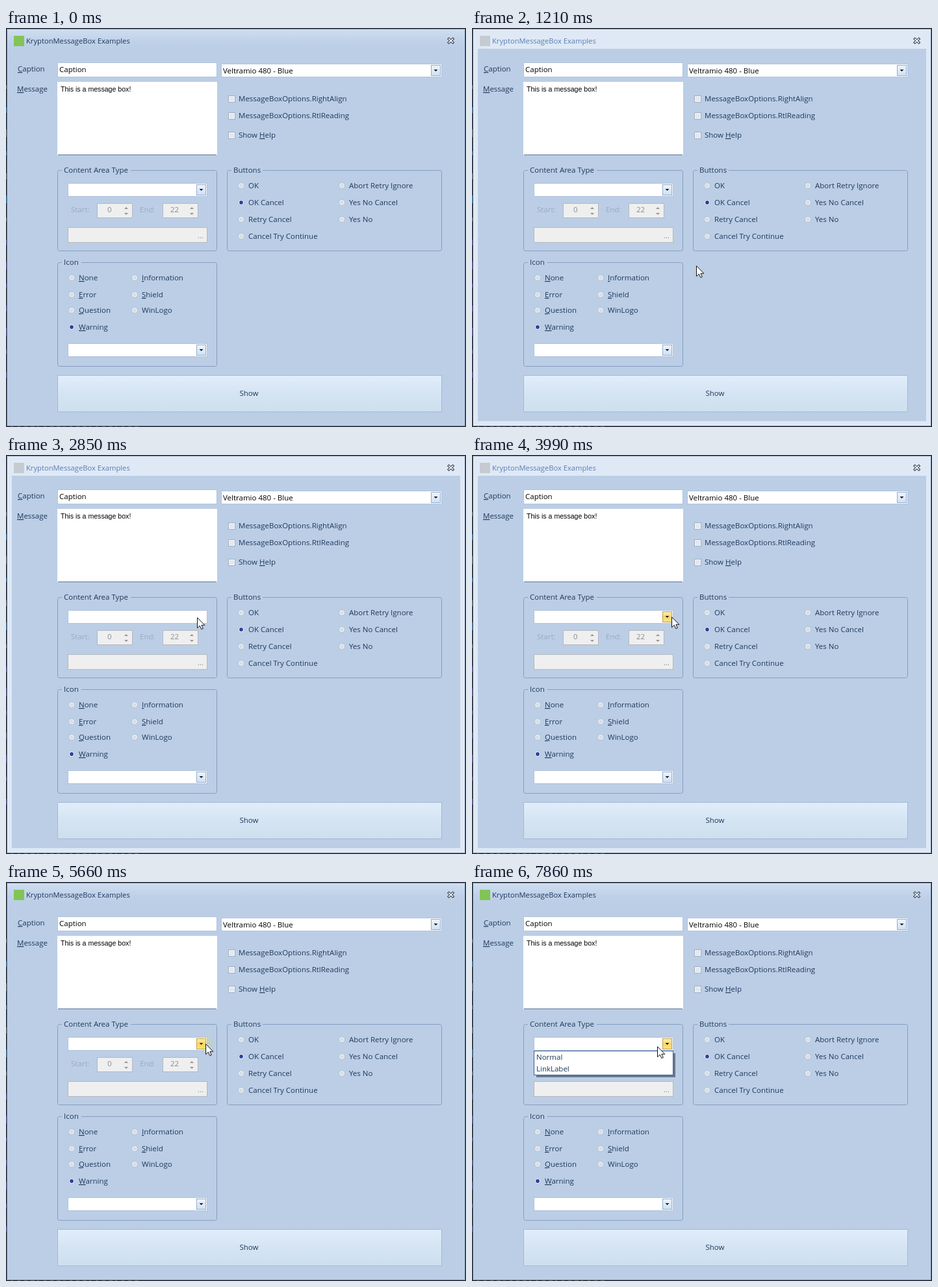
An HTML page that plays this animation: 708x615 px, repeating every 8 s.

```html
<!DOCTYPE html>
<html lang="en">
<head>
<meta charset="utf-8">
<title>Message box examples</title>
<style>
html, body { margin: 0; width: 100%; height: 100%; overflow: hidden; background: #1d1f24; }
svg { display: block; width: 708px; height: 615px; }
text { font: 11.5px "Open Sans", "Noto Sans", sans-serif; fill: #1e395b; white-space: pre; }
.title { font-size: 11.2px; }
.note { font: 10.6px "Liberation Sans", Arial, sans-serif; fill: #000; }
.value { fill: #000; }
.dim { fill: #9ba9bd; }
.off { fill: #858a91; }
.mid { text-anchor: middle; }
.key { text-decoration: underline; }

.anim { animation: 8s step-end -5ms infinite; }
.idle { animation-name: idle; }
.lit { animation-name: lit; }
.blank { animation-name: blank; }
.hot { animation-name: hot; }
.popup { animation-name: popup; }
.ring { animation-name: ring; }
.cursor { animation-name: move; }

@keyframes idle { 0%, 67.375%, 100% { opacity: 0 } 3% { opacity: 1 } }
@keyframes lit { 0%, 8.125%, 100% { opacity: 0 } 4.7% { opacity: 1 } }
@keyframes blank { 0%, 36.5%, 49.125%, 100% { opacity: 0 } 35.625%, 48.375% { opacity: 1 } }
@keyframes hot { 0%, 38.25% { opacity: 0 } 36.5%, 49.125%, 100% { opacity: 1 } }
@keyframes popup { 0% { opacity: 0 } 87.375%, 100% { opacity: 1 } }
@keyframes ring {
  0%, 71.625%, 89.875%, 100% { opacity: 0 }
  67.375% { opacity: .5; animation-timing-function: steps(5) }
  86.5% { opacity: .45; animation-timing-function: steps(4) }
}
@keyframes move {
  0% { transform: translate(500px, 640px) }
  3% { transform: translate(500px, 610px); animation-timing-function: steps(5) }
  7.25% { transform: translate(442px, 543px); animation-timing-function: steps(6) }
  12.5% { transform: translate(397px, 416px); animation-timing-function: steps(3) }
  15.125% { transform: translate(345px, 366px); animation-timing-function: steps(4) }
  18.625% { transform: translate(308px, 284px); animation-timing-function: steps(5) }
  22.875% { transform: translate(291px, 254px) }
  30.5% { transform: translate(291px, 254px); animation-timing-function: steps(2) }
  32.25%, 34.75% { transform: translate(291px, 250px) }
  35.625% { transform: translate(294px, 250px); animation-timing-function: steps(3) }
  38.25% { transform: translate(312px, 250px) }
  41.5% { transform: translate(312px, 249px) }
  47.5% { transform: translate(312px, 249px); animation-timing-function: steps(3) }
  49.875% { transform: translate(307px, 249px) }
  95.625% { transform: translate(307px, 249px); animation-timing-function: steps(3) }
  98.25%, 100% { transform: translate(285px, 253px) }
}
</style>
</head>
<body>
<svg id="stage" viewBox="0 0 708 615"></svg>
<script>
const INK = '#1e395b', PANEL = '#bbcee6', EDGE = '#5f7390';

// Labels take the vertical middle of the capitals; "&" marks the access key.
const text = (x, y, s, cls = '') =>
  `<text x="${x}" y="${y + 4}" class="${cls}">${s.replace(/&(\w)/, '<tspan class="key">$1</tspan>')}</text>`;

// Crisp box covering the pixels from x,y up to r,b.
const box = (x, y, r, b, fill, line, round = 0) =>
  `<rect x="${x + .5}" y="${y + .5}" width="${r - x - 1}" height="${b - y - 1}" rx="${round}" fill="${fill}" stroke="${line}"/>`;

const fill = (x, y, r, b, color) =>
  `<rect x="${x}" y="${y}" width="${r - x}" height="${b - y}" fill="${color}"/>`;

const arrow = (x, y, color = '#1a1a1a', h = 3) =>
  `<path d="M${x - 3} ${y}h6l-3 ${h}z" fill="${color}"/>`;

const anim = (name, body) => `<g class="anim ${name}">${body}</g>`;

const gradient = (id, ...stops) =>
  `<linearGradient id="${id}" x2="0" y2="1">${stops.map(([at, c]) =>
    `<stop offset="${at}" stop-color="${c}"/>`).join('')}</linearGradient>`;

const group = (x, y, r, b, label, gap) =>
  box(x, y, r, b, 'none', '#859ebf', 3) + fill(x + 7, y - 1, x + 7 + gap, y + 2, PANEL) +
  text(x + 10, y, label);

const combo = (x, y, r, b) =>
  box(x, y, r, b, '#fff', '#b1c3db') +
  box(r - 17, y + 2, r - 2, b - 2, 'url(#drop)', '#93acd0') + arrow(r - 9.5, y + 9);

const radio = (x, y, label, on) =>
  `<circle cx="${x}" cy="${y}" r="4.6" fill="${on ? '#f4f8fd' : '#e6ebf1'}" stroke="#b2bfd0"/>` +
  `<circle cx="${x}" cy="${y}" r="${on ? 2.9 : 2.5}" fill="${on ? '#2c429b' : '#d6dde6'}"/>` +
  text(x + 11, y, label);

const check = (y, label) =>
  box(342, y - 5, 353, y + 6, '#f5f7fa', '#a0aec2') + fill(344, y - 3, 351, y + 4, '#e3e8ef') +
  text(358, y, label);

const spinner = (x, label, value, labelX, valueX) =>
  text(labelX, 280, label, 'dim') + box(x, 270, x + 55, 293, '#efefef', '#b3b8c0') +
  text(valueX, 280, value, 'off') + arrow(x + 45, 279, '#939393', -3) + arrow(x + 45, 285, '#939393');

const titleBar = (logo, ink) =>
  fill(12, 12, 28, 28, logo) +
  `<text x="31" y="24" class="title" style="fill:${ink}">KryptonMessageBox Examples</text>`;

const defs = '<defs>' +
  gradient('head', [0, '#cfdef0'], [.6, '#bfd1e9'], [1, PANEL]) +
  gradient('drop', [0, '#edf4fd'], [1, '#cfe0f4']) +
  gradient('face', [0, '#e1edfb'], [.5, '#d5e4f3'], [1, '#cddfee']) +
  gradient('glow', [0, '#fbe6a0'], [.15, '#f9de82'], [.7, '#f9df84'], [1, '#fdf2b0']) +
  gradient('gold', [0, '#fdeeb5'], [.5, '#f9d66b'], [1, '#fbe384']) + '</defs>';

// Slivers of the desktop behind the window.
let desk = '';
for (let i = 0; i < 14; i++)
  desk += fill(0, 88 + i * 34, 1, 94 + i * 34 + i % 3 * 3, i > 6 ? '#5a4680' : i % 2 ? '#356f96' : '#666');
for (let i = 0; i < 20; i++)
  desk += fill(8 + i * 10, 614, 11 + i * 10 + i % 4, 615, '#555');

const cross = (color, width) =>
  `<path d="M681.7 16.9l6 5.4m0-5.4l-6 5.4" stroke="${color}" stroke-width="${width}" stroke-linecap="square"/>`;

const frame =
  fill(0, 0, 708, 615, '#1d1f24') + desk +
  box(1, 1, 707, 614, PANEL, EDGE) + fill(2, 2, 706, 34, 'url(#head)') +
  titleBar('#82c455', INK) +
  anim('idle', box(1, 1, 707, 614, '#dfe9f5', EDGE) + fill(9, 32, 699, 606, PANEL) +
    titleBar('#c5cbd1', '#5c7cb8')) +
  cross('#35404f', 3.8) + cross('#f7faff', 1.6);

const fields =
  text(18, 63, '&Caption') + box(79, 53, 325, 76, '#fff', '#b1c3db') + text(82, 64, 'Caption', 'value') +
  combo(331, 55, 671, 76) + text(334, 66, 'Veltramio 480 - Blue', 'value') +
  text(17, 94, '&Message') + fill(79, 83, 325, 196, '#fff') + fill(80, 195, 324, 196, '#5f7697') +
  text(84, 94, 'This is a message box!', 'note') +
  check(109, 'MessageBoxOptions.RightAlign') +
  check(135, 'MessageBoxOptions.RtlReading') +
  check(165, 'Show &Help');

const content =
  group(79, 219, 325, 344, 'Content Area Type', 106) + combo(95, 239, 310, 260) +
  anim('blank', fill(292, 240, 309, 259, '#fff')) +
  anim('hot', box(293, 241, 308, 258, 'url(#gold)', '#c2a04c') + arrow(300.5, 248)) +
  spinner(140, 'Start:', '0', 100, 156) + spinner(241, 'End:', '22', 206, 253) +
  box(95, 307, 310, 331, '#efefef', '#b3b8c0') + text(295, 320, '...', 'off');

const buttons =
  group(340, 219, 671, 344, 'Buttons', 48) +
  ['OK', 'OK Cancel', 'Retry Cancel', 'Cancel Try Continue'].map((s, i) => radio(362, 243 + 26 * i, s, i === 1)).join('') +
  ['Abort Retry Ignore', 'Yes No Cancel', 'Yes No'].map((s, i) => radio(517, 243 + 26 * i, s)).join('');

const rows = [385, 411, 435, 461];
const icons =
  group(79, 361, 325, 522, 'Icon', 30) +
  ['&None', '&Error', '&Question', '&Warning'].map((s, i) => radio(101, rows[i], s, i === 3)).join('') +
  ['&Information', '&Shield', 'WinLogo'].map((s, i) => radio(198, rows[i], s)).join('') +
  combo(95, 486, 310, 507);

const show =
  box(79, 535, 671, 592, 'url(#face)', '#a3b9d5') + text(374, 563, 'Show', 'mid') +
  anim('lit', box(79, 535, 671, 592, 'url(#glow)', '#c3cfda') +
    '<text x="374" y="567" class="mid" style="fill:#6b5a2c">Show</text>');

const overlay =
  anim('popup', fill(99, 298, 313, 301, '#68788e') + fill(310, 264, 313, 301, '#68788e') +
    box(95, 260, 310, 298, '#fff', '#3f5f8f') + text(99, 270, 'Normal') + text(99, 288, 'LinkLabel')) +
  anim('ring', '<circle cx="307" cy="249" r="12" fill="#f6e400"/>') +
  anim('cursor', '<path d="M.5.7V16.7L4.3 13.2L6.8 18.6L9.3 17.5L6.9 12.3H11.8Z" fill="#fff" stroke="#111"/>');

document.getElementById('stage').innerHTML =
  defs + frame + fields + content + buttons + icons + show + overlay;
</script>
</body>
</html>
```
